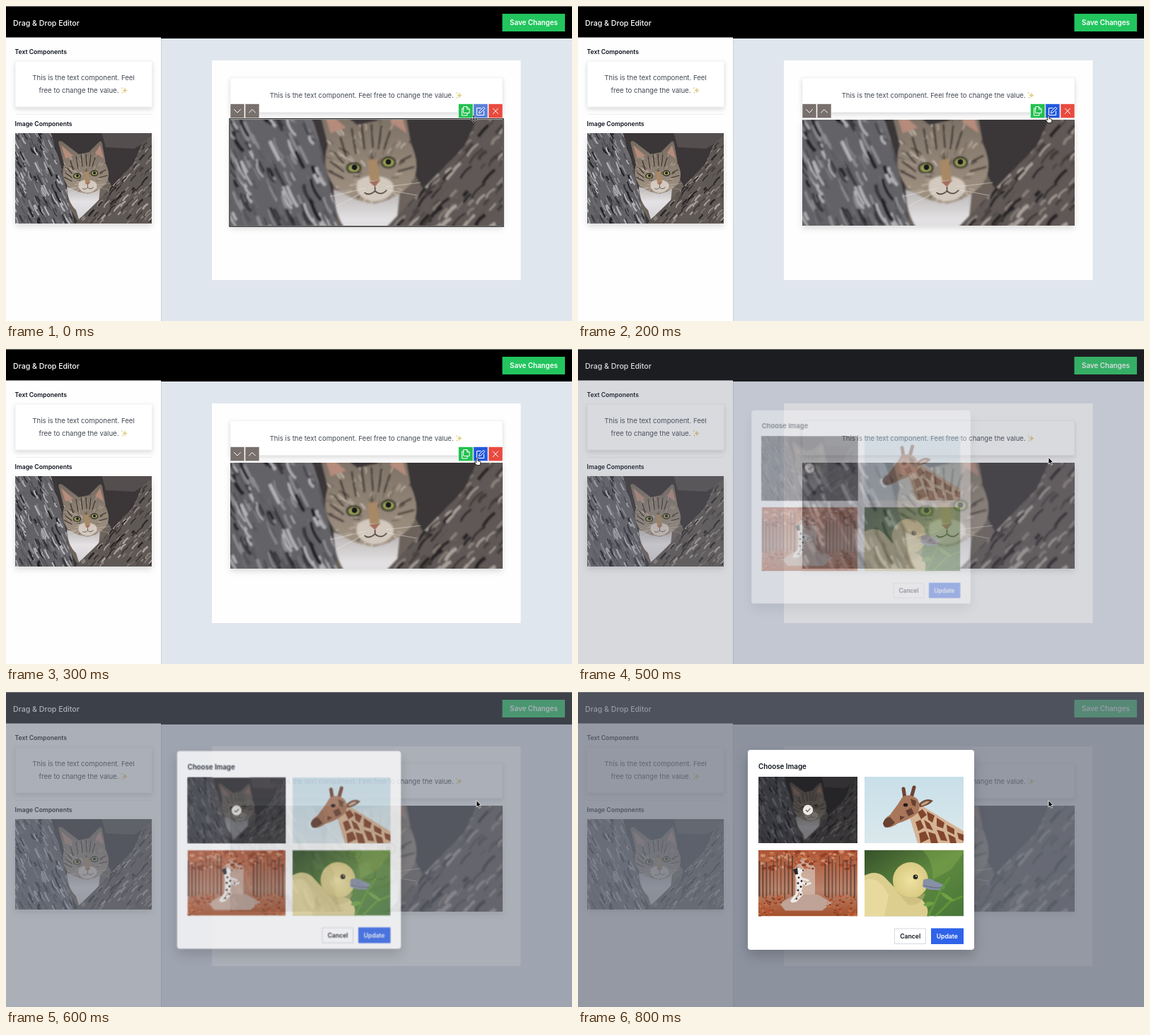
Write an HTML page that moves like this. It is 800x446 px and loops after 1.8 s.

```html
<!DOCTYPE html>
<html lang="en">
<head>
<meta charset="utf-8">
<title>Drag &amp; Drop Editor</title>
<style>
html, body { margin: 0; width: 100%; height: 100%; overflow: hidden; }
svg { display: block; }
#stage { width: 100vw; height: 100vh; }
text { font-family: Inter, "Open Sans", sans-serif; font-size: 9.6px; fill: #414752; }
.mid { text-anchor: middle; }
.bold { font-weight: 600; fill: #0d121c; font-size: 8.62px; }
.card { fill: #fff; stroke: #eceef1; stroke-width: .8; filter: drop-shadow(0 3px 3px #0002); }
.photo { filter: drop-shadow(0 4px 4px #0002); }
.icon { fill: none; stroke: #fff; stroke-width: 1; stroke-linecap: round; stroke-linejoin: round; }
.star { fill: #e6d391; }
</style>
</head>
<body>
<svg id="stage" viewBox="0 0 800 446" preserveAspectRatio="none">
  <defs>
    <linearGradient id="sky" x2="0" y2="1"><stop stop-color="#c8dfe9"/><stop offset="1" stop-color="#dbe8ec"/></linearGradient>
    <linearGradient id="grass" x2="1" y2="1"><stop stop-color="#36512a"/><stop offset=".5" stop-color="#5f893f"/><stop offset="1" stop-color="#48763a"/></linearGradient>
    <linearGradient id="autumn" x2="0" y2="1"><stop stop-color="#ae5535"/><stop offset=".6" stop-color="#b8846c"/><stop offset="1" stop-color="#a4502c"/></linearGradient>
    <radialGradient id="down"><stop stop-color="#efe2a0"/><stop offset="1" stop-color="#d9ca83"/></radialGradient>
    <linearGradient id="face" x2="0" y2="1"><stop stop-color="#756a60"/><stop offset="1" stop-color="#a39585"/></linearGradient>
    <linearGradient id="chest" x2="0" y2="1"><stop stop-color="#b9b4b3"/><stop offset=".4" stop-color="#e4e2e4"/><stop offset="1" stop-color="#d0ced2"/></linearGradient>
    <filter id="soft"><feGaussianBlur stdDeviation=".5"/></filter>
    <clipPath id="trunk"><path d="M-2-2H50L64 45L84 130H-2Z"/></clipPath>
    <clipPath id="branch"><path d="M82 130L112 101L137 75L166 45L180 14L195 2V130Z"/></clipPath>
    <path id="head" d="M69 44L61 13Q63 9 68 13L90 30L104 27L119 12Q122 10 123 15L128 43Q136 61 128 72Q116 84 102 86Q84 84 73 73Q64 60 69 44Z"/>
    <clipPath id="inHead"><use href="#head"/></clipPath>
    <path id="sparkle" d="M0-4.5Q.6-.6 4.2 0Q.6.6 0 4.5Q-.6.6-4.2 0Q-.6-.6 0-4.5ZM-4-5Q-3.8-3.4-2.4-3.2Q-3.8-3-4-1.4Q-4.2-3-5.6-3.2Q-4.2-3.4-4-5ZM-3.4 1.4Q-3.2 3-1.8 3.2Q-3.2 3.4-3.4 5Q-3.6 3.4-5 3.2Q-3.6 3-3.4 1.4Z"/>

    <symbol id="cat" viewBox="0 0 193 128" preserveAspectRatio="xMidYMid slice">
      <path fill="#3b3637" d="M0 0H193V128H0Z"/>
      <g filter="url(#soft)">
        <path fill="#6a6463" d="M122-2H195V6L168 22L128 20Z" opacity=".55"/>
        <g clip-path="url(#trunk)"><path fill="#636266" d="M-2-2H90V130H-2Z"/><g id="barkLeft"></g></g>
        <path fill="#6d645c" d="M72 66L128 60L138 78L112 105L90 128L76 104Z"/>
        <path fill="url(#chest)" d="M73 76Q74 98 86 109L92 128L104 117L118 97L120 78L102 84Z"/>
        <g clip-path="url(#branch)"><path fill="#5f5956" d="M80-2H195V130H80Z"/><g id="barkRight"></g></g>
        <use href="#head" fill="url(#face)"/>
        <g id="fur" clip-path="url(#inHead)"></g>
        <path fill="#b58b7c" d="M71 36L65 17L82 32ZM113 28L120 17L125 36Z"/>
        <path fill="none" stroke="#39322d" stroke-width="1.2" stroke-linecap="round" d="M86 33L89 50M93 30L95 47M100 30L101 46M107 31L105 47M113 35L109 47M78 39L82 52M71 56L80 63M70 63L80 68M128 52L120 56M130 60L119 63M74 50L80 57"/>
        <path fill="#d3c9be" d="M90 70Q97 64 108 67Q118 70 115 78Q108 86 99 84Q87 80 90 70Z"/>
        <path fill="#a78966" d="M97 55L104 54L106 70H99Z"/>
        <g fill="#999e58" stroke="#272321" stroke-width="1.3"><ellipse cx="87.5" cy="60.7" rx="4.8" ry="3.5"/><ellipse cx="112" cy="56.7" rx="4.8" ry="3.6"/></g>
      </g>
      <g fill="#17191a"><circle cx="88" cy="60.2" r="1.9"/><circle cx="112" cy="56.4" r="1.9"/></g>
      <path fill="#a46e5d" d="M98.5 70.5L106 69.5L102.5 74Z"/>
      <path fill="none" stroke="#50443d" stroke-width=".8" d="M102.5 74V77Q98 81 95 78M102.5 77Q107 81 111 76"/>
      <path fill="none" stroke="#f3f0ef" stroke-width=".25" d="M96 75L71 81M96 77L75 88M110 74L135 71M110 76L132 80"/>
    </symbol>

    <symbol id="giraffe" viewBox="0 0 140 94" preserveAspectRatio="none">
      <path fill="url(#sky)" d="M0 0H140V94H0Z"/>
      <path fill="#d5b395" d="M64 58Q76 35 84 43L112 60L140 77V94H75Z"/>
      <g fill="#81462d"><path d="M75 50L82 46L88 54L80 60ZM88 49L99 55L96 65L90 61ZM72 64L79 61L84 72L76 77ZM84 61L92 66L97 76L88 73ZM102 58L113 65L111 73L102 70ZM77 80L86 77L91 88L79 94ZM90 78L100 81L104 94H94ZM102 75L112 78L117 91L108 90ZM116 68L127 74L127 82L117 77ZM118 81L128 86L130 94H121ZM131 79L140 82V91L133 88Z"/></g>
      <path fill="#6f4937" d="M76 39Q87 28 97 34Q89 42 78 43Z"/>
      <path fill="#c7a287" d="M80 39Q87 33 92 35Q87 40 80 41Z"/>
      <path fill="none" stroke="#704132" stroke-width="5" stroke-linecap="round" d="M57 30L55 17M66 30L70 15"/>
      <path fill="#a8775a" d="M26 67Q27 59 36 54L47 39L54 28Q66 23 75 32Q81 42 74 52Q64 61 47 66Q36 74 29 71Z"/>
      <path fill="#674131" d="M26 66Q28 58 36 57L43 65Q34 74 28 71ZM58 48L66 44L70 52L62 56ZM50 55L57 57L50 62ZM65 31L73 34L72 42L67 40Z"/>
      <ellipse cx="58" cy="40" rx="3.2" ry="2.4" fill="#211a19"/>
    </symbol>

    <symbol id="dog" viewBox="0 0 140 94" preserveAspectRatio="none">
      <path fill="url(#autumn)" d="M0 0H140V94H0Z"/>
      <g filter="url(#soft)">
        <path fill="#d8c5b9" d="M52 25L65 6L80 25V64H52Z" opacity=".7"/>
        <g id="leaves"></g>
        <path fill="#bfa396" d="M52 63H84L104 75L90 86H38L30 76Z"/>
        <g id="woods"></g><g id="litter"></g>
      </g>
      <path fill="none" stroke="#eee9e5" stroke-width="3.4" stroke-linecap="round" stroke-linejoin="round" d="M58 55L61 63L53 72L48 73M56 55L54 63L47 72M59 42L67 49L73 47M60 40L70 43"/>
      <path fill="#f0ece9" d="M50 28Q54 22 60 27L64 29L60 34L63 44L62 56Q57 61 54 56L54 42Z"/>
      <g fill="#292526"><path d="M49 28L55 25L56 34L52 35Z"/><circle cx="57" cy="39" r="1.4"/><circle cx="61" cy="44" r="1.4"/><circle cx="56" cy="47" r="1.5"/><circle cx="60" cy="52" r="1.5"/><circle cx="56" cy="57" r="1.4"/><circle cx="60" cy="63" r="1.2"/><circle cx="54" cy="69" r="1.2"/><circle cx="67" cy="48" r="1"/><circle cx="63" cy="29" r="1"/></g>
    </symbol>

    <symbol id="duck" viewBox="0 0 140 94" preserveAspectRatio="none">
      <path fill="url(#grass)" d="M0 0H140V94H0Z"/>
      <path fill="#82a84e" d="M82 0Q98 16 96 42L122 28L140 4V0Z" opacity=".45"/>
      <path fill="#dcce8f" d="M0 36Q17 27 29 39L48 59L81 70Q93 83 88 94H0Z"/>
      <path fill="#eee0a5" d="M0 43Q20 35 34 64L28 94H0Z" opacity=".7"/>
      <ellipse cx="65" cy="43" rx="25" ry="26" fill="url(#down)"/>
      <path fill="#c7b778" d="M45 58Q63 74 86 61Q82 79 62 78Z" opacity=".55"/>
      <path fill="#8690a6" d="M83 42Q92 38 99 44L112 49Q116 55 107 57L91 56L82 52Z"/>
      <path fill="none" stroke="#626577" stroke-width="1" d="M84 50Q97 55 112 53"/>
      <circle cx="72" cy="38" r="3.4" fill="#29251e"/><circle cx="73" cy="37" r=".9" fill="#fff"/>
      <path fill="none" stroke="#5d9637" stroke-width="3" stroke-linecap="round" d="M90 94L107 58L120 39M100 94L121 73L138 66"/>
      <path fill="#6fa144" d="M107 60Q116 60 128 73Q114 72 107 60ZM99 75Q89 70 83 78Q90 84 99 75Z"/>
    </symbol>
  </defs>

  <path fill="#e0e6ee" d="M0 0H800V446H0Z"/>
  <path fill="#000" d="M0 0H800V46H0Z"/>
  <path fill="#fefefe" d="M0 44.5H219V446H0Z"/>
  <path stroke="#ccd1d8" d="M219.5 46V446"/>
  <text x="10" y="27.5" style="font-size:10.6px;font-weight:500;fill:#fff">Drag &amp; Drop Editor</text>
  <path fill="#22c55e" d="M701.5 11H790V36H701.5Z"/>
  <text class="bold mid" x="746" y="27.3" style="font-size:9.8px;fill:#fff">Save Changes</text>

  <text class="bold" x="12.6" y="68">Text Components</text>
  <rect class="card" x="13" y="78" width="193.5" height="65"/>
  <text class="mid" x="109.5" y="105">This is the text component. Feel</text>
  <text class="mid" x="103" y="123">free to change the value.</text>
  <use class="star" href="#sparkle" x="168" y="119.5"/>
  <path stroke="#eceef0" d="M13 153.5H207"/>
  <text class="bold" x="12.6" y="170">Image Components</text>
  <use class="photo" href="#cat" x="13" y="180" width="193" height="128"/>

  <path fill="#fefefe" d="M291 77H727.5V388H291Z"/>
  <rect class="card" x="317" y="101.5" width="385" height="49"/>
  <text class="mid" x="502.7" y="129.7">This is the text component. Feel free to change the value.</text>
  <use class="star" href="#sparkle" x="641" y="126.5"/>
  <use class="photo" href="#cat" x="317" y="161" width="385" height="150"/>
  <rect id="outline" x="316" y="159.7" width="387" height="152.4" fill="none" stroke="#111" stroke-width="1.3"/>

  <g id="tools">
    <g stroke="#fff" stroke-width=".6">
      <path fill="#78706c" d="M317 138.5H337V158.7H317ZM338 138.5H358V158.7H338Z"/>
      <path fill="#22c04f" d="M639.5 138.5H660V158.7H639.5Z"/>
      <path id="edit" d="M660.7 138.5H681V158.7H660.7Z"/>
      <path fill="#ea4a3f" d="M682 138.5H702V158.7H682Z"/>
    </g>
    <path class="icon" d="M322.5 146.5L327 151L331.5 146.5M343.5 151L348 146.5L352.5 151M688.5 145L695.5 152.5M695.5 145L688.5 152.5
      M647 142.5H651.5L655 146V151.5H647ZM651.5 142.5V146H655M647 145H644.5V155H652V151.5
      M671 144.5H665.5V154.5H675.5V149M668.5 151.5L669.2 148.8L674.8 143.2L676.8 145.2L671.2 150.8Z"/>
  </g>

  <path id="veil" fill="#6b7280" d="M0 0H800V446H0Z"/>
  <path fill="#777" d="M0 0H800V1H0Z"/>
  <g id="modal">
    <rect x="240" y="82" width="320" height="283" rx="4" fill="#fff" style="filter:drop-shadow(0 8px 9px #0003)"/>
    <text class="bold" x="255" y="108.5" style="font-size:9.8px">Choose Image</text>
    <use href="#cat" x="255" y="120" width="140" height="94"/>
    <path fill="#111318" opacity=".5" d="M255 120H395V214H255Z"/>
    <circle cx="325" cy="167" r="7.2" fill="#eee9e6"/>
    <path fill="none" stroke="#555" stroke-width="1.2" d="M322 167L324.3 169.3L328.3 164.8"/>
    <use href="#giraffe" x="405" y="120" width="140" height="94"/>
    <use href="#dog" x="255" y="224" width="140" height="93.5"/>
    <use href="#duck" x="405" y="224" width="140" height="93.5"/>
    <rect x="447.5" y="335" width="44" height="21.5" fill="#fff" stroke="#d5d9df"/>
    <path fill="#2f63e9" d="M499 334.5H545V357H499Z"/>
    <text class="bold mid" x="469.7" y="349">Cancel</text>
    <text class="bold mid" x="521.8" y="349" style="fill:#fff">Update</text>
  </g>

  <g stroke="#fff" stroke-width=".8" fill="#000">
    <path id="cross" d="M661 154.5L663 157H661.7V159.3H664V158L666.5 160L664 162V160.7H661.7V163H663L661 165.5L659 163H660.3V160.7H658V162L655.5 160L658 158V159.3H660.3V157H659Z" stroke-width=".5"/>
    <path id="hand" fill="#fff" stroke="#000" d="M-1.2-4Q0-5.4 1-4V-.5L4.2.2Q5.2.7 4.8 2.2L4 5.5H-.7L-3.8 1.8Q-3.8.3-2.3.8L-1.2 1.8Z"/>
    <path id="arrow" d="M665 153.5V163L667.2 161L668.8 164.4L670.4 163.7L668.9 160.4H671.7Z"/>
  </g>
</svg>
<script>
const $ = id => document.getElementById(id);
let seed = 7;
const rnd = (a, b) => {
  seed = (seed * 16807) % 2147483647;
  return a + (b - a) * seed / 2147483647;
};
const pick = list => list[Math.floor(rnd(0, list.length))];
const fill = (id, n, make) => {
  $(id).innerHTML = Array.from({ length: n }, (_, i) => make(i)).join("");
};
const stroke = (x, y, dx, dy, width, colors) =>
  `<path fill="none" stroke="${pick(colors)}" stroke-width="${width}" d="M${x} ${y}q${dx * .3 + rnd(-2, 2)} ${dy * .6} ${dx} ${dy}"/>`;
const dot = (x, y, r, colors) =>
  `<ellipse cx="${x}" cy="${y}" rx="${r}" ry="${r * .65}" fill="${pick(colors)}"/>`;

function bark(x0, x1, dx, dy, colors) {
  const k = rnd(.4, 1.3);
  return stroke(rnd(x0, x1), rnd(-8, 130), dx * k, dy * k, rnd(.6, 2.6), colors);
}
function fur() {
  const a = rnd(0, 2 * Math.PI), r = rnd(8, 42), x = Math.cos(a), y = Math.sin(a);
  return stroke(102 + x * r, 68 + y * r, x * 5, y * 5, rnd(.4, 1.1), ["#4f443c", "#b3a597", "#cbc0b4", "#71655a", "#988a7b"]);
}

fill("barkLeft", 330, () => bark(-8, 80, 6, 12, ["#232226", "#3a393e", "#57565b", "#8b8b90", "#b2b1b5", "#6f6e73"]));
fill("barkRight", 360, () => bark(80, 195, 8, -9, ["#282425", "#423c3b", "#5d5653", "#8b817b", "#aba29c"]));
fill("fur", 170, fur);
fill("leaves", 110, () => dot(rnd(0, 140), rnd(0, 28), rnd(1, 4), ["#a84b2e", "#c06942", "#943f28", "#cf916f"]));
fill("woods", 20, i => {
  const near = Math.abs(i % 10 - 5) / 5;
  const x = i < 10 ? i * 5.2 : 140 - (i - 10) * 5.2;
  return `<path fill="#573a31" opacity=".75" d="M${x} ${rnd(3, 22)}h${1 + near * 1.6}V${rnd(63, 70)}h${-1 - near * 1.6}Z"/>`;
});
fill("litter", 150, () => {
  const y = rnd(65, 94), side = rnd(0, 1) < .5;
  return dot(side ? rnd(0, 108 - y) : rnd(y + 18, 140), y, rnd(.8, 2.4), ["#b95730", "#8d3d23", "#c97046"]);
});

const show = (id, on) => $(id).setAttribute("visibility", on ? "visible" : "hidden");

function draw(now) {
  const t = Math.floor(now % 1800 / 100) * 100;
  const open = t >= 500;
  const x = Math.min(1, Math.max(0, (t - 440) / 300));
  const p = 1 - (1 - x) ** 2;

  show("outline", t < 100);
  show("cross", t < 100);
  show("hand", t >= 100 && !open);
  show("arrow", open);
  show("tools", !open);
  $("edit").setAttribute("fill", t < 100 ? "#5a80d8" : "#2459dc");
  $("hand").setAttribute("transform", t < 300 ? "translate(665 160)" : "translate(666 159)");
  $("veil").setAttribute("opacity", .72 * p);
  $("modal").setAttribute("opacity", p);
  $("modal").setAttribute("transform", `translate(400 223.5) scale(${.95 + .05 * p}) translate(-400 -223.5)`);
}

const start = performance.now();
function tick() {
  draw(performance.now() - start);
  requestAnimationFrame(tick);
}
tick();
</script>
</body>
</html>
```
